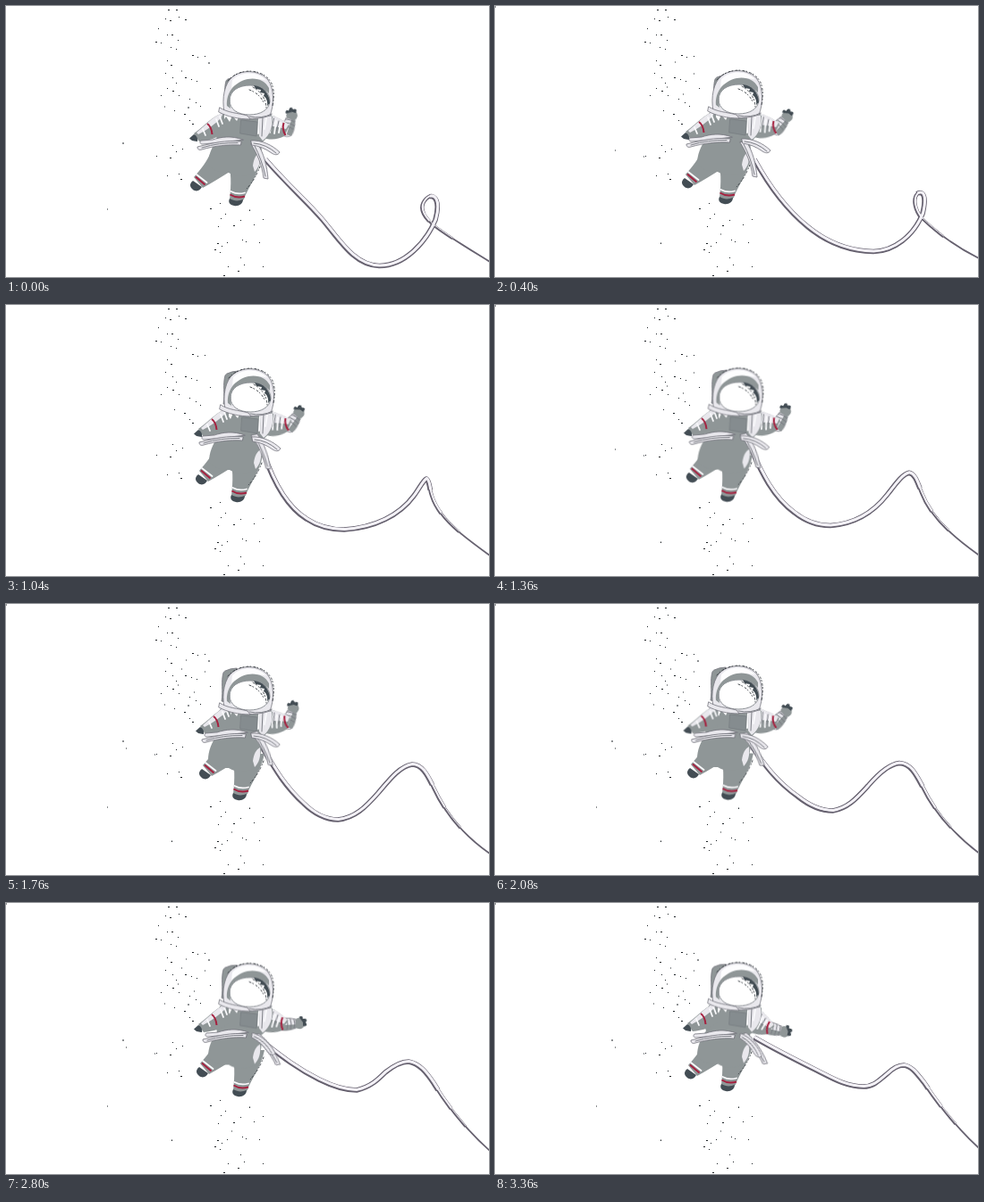
Recreate the animation shown at these times as an HTML page without scripts. Size 540 by 304 pixels, loop 3440 ms.

```html
<!DOCTYPE html>
<html lang="en">
<head>
<meta charset="utf-8">
<title>Astronaut on a tether</title>
<style>
html, body { margin: 0; width: 100%; height: 100%; overflow: hidden; background: #fff; }
svg { display: block; width: 100vw; height: 100vh; }
path { stroke-linecap: round; stroke-linejoin: round; }

.move { animation: 3.44s infinite; }
.suit { fill: #8f9697; }
.pale { fill: #e9e8ed; }
.white { fill: #fdfdfe; }
.dark { fill: #434d54; }
.edge { stroke: #74747d; stroke-width: .8; }
.line { fill: none; stroke: #7c7e85; stroke-width: 1; }
.shine { fill: none; stroke: #fafafc; stroke-width: 1.8; }
.red { fill: none; stroke: #a5213f; stroke-width: 2; stroke-linecap: butt; }
.speck { fill: none; stroke: #30363b; stroke-width: .9; stroke-dasharray: 2 2 1 3; }
.dots { fill: none; stroke: #1c2226; stroke-width: 1; stroke-linecap: butt; shape-rendering: crispEdges; }

.rope { fill: none; animation: rope 3.44s infinite; stroke-linecap: butt; }
.rim { stroke: #66616f; }
.core { stroke: #f3f1f6; transform: translate(.5px, -.6px); }

.body { animation-name: body; }
.pack { animation-name: pack; }
.arm-l { animation-name: arm-l; }
.arm-r { animation-name: arm-r; transform-origin: 292px 130px; }
.hand { animation-name: hand; }
.leg-l { animation-name: leg-l; }
.leg-r { animation-name: leg-r; }
.flap-l { animation-name: flap-l; }
.flap-r { animation-name: flap-r; transform-origin: 278px 152px; }
.strap { animation-name: strap; transform-origin: 280px 154px; }
.blink { animation-name: blink; animation-timing-function: step-end; }
.blink.alt { animation-name: blink-alt; }

@keyframes body {
  0% { transform: translate(0, 0); animation-timing-function: steps(5); }
  11.627% { transform: translate(0, -1px); animation-timing-function: steps(8); }
  30.232% { transform: translate(1px, -2px); animation-timing-function: steps(9); }
  51.162% { transform: translate(0, -3px); animation-timing-function: steps(8); }
  69.767% { transform: translate(0, -5px); animation-timing-function: steps(5); }
  81.395% { transform: translate(0, -5.5px); animation-timing-function: steps(7); }
  97.674%, 100% { transform: translate(0, -6.5px); }
}
@keyframes pack {
  0% { transform: translate(3px, 4px); animation-timing-function: steps(5); }
  11.627% { transform: translate(3px, 3px); animation-timing-function: steps(8); }
  30.232% { transform: translate(1px, 1px); animation-timing-function: steps(9); }
  51.162%, 100% { transform: translate(0, 0); }
}
@keyframes arm-l {
  0% { transform: translate(0, 0); animation-timing-function: steps(5); }
  11.627% { transform: translate(3px, -2px); animation-timing-function: steps(8); }
  30.232% { transform: translate(5px, -4px); animation-timing-function: steps(9); }
  51.162% { transform: translate(7px, -6px); animation-timing-function: steps(8); }
  69.767% { transform: translate(4px, -7px); animation-timing-function: steps(5); }
  81.395% { transform: translate(5px, -7px); animation-timing-function: steps(7); }
  97.674%, 100% { transform: translate(5px, -8px); }
}
@keyframes arm-r {
  0% { transform: translate(0, 0) rotate(0deg); animation-timing-function: steps(5); }
  11.627% { transform: translate(1px, -1px) rotate(-3deg); animation-timing-function: steps(8); }
  30.232% { transform: translate(2px, -2px) rotate(-6deg); animation-timing-function: steps(9); }
  51.162% { transform: translate(1px, -3px) rotate(-8deg); animation-timing-function: steps(8); }
  69.767% { transform: translate(0, -5px) rotate(-3deg); animation-timing-function: steps(5); }
  81.395% { transform: translate(-1px, -5px) rotate(7deg); animation-timing-function: steps(7); }
  97.674%, 100% { transform: translate(-2px, -4px) rotate(19deg); }
}
@keyframes hand {
  0% { transform: translate(314px, 140px) rotate(-72deg); animation-timing-function: steps(5); }
  11.627% { transform: translate(315px, 138px) rotate(-50deg); animation-timing-function: steps(8); }
  30.232% { transform: translate(317px, 136px) rotate(-55deg); animation-timing-function: steps(9); }
  51.162% { transform: translate(315px, 134px) rotate(-70deg); animation-timing-function: steps(8); }
  69.767% { transform: translate(312px, 134px) rotate(-26deg); animation-timing-function: steps(5); }
  81.395% { transform: translate(310px, 136px) rotate(-3deg); animation-timing-function: steps(7); }
  97.674%, 100% { transform: translate(306px, 140px) rotate(14deg); }
}
@keyframes leg-l {
  0% { transform: translate(0, 0); animation-timing-function: steps(5); }
  11.627% { transform: translate(3px, -3px); animation-timing-function: steps(8); }
  30.232% { transform: translate(6px, -6px); animation-timing-function: steps(9); }
  51.162% { transform: translate(10px, -11px); animation-timing-function: steps(8); }
  69.767% { transform: translate(8px, -13px); animation-timing-function: steps(5); }
  81.395% { transform: translate(7px, -12px); animation-timing-function: steps(7); }
  97.674%, 100% { transform: translate(6px, -10px); }
}
@keyframes leg-r {
  0% { transform: translate(0, 0); animation-timing-function: steps(5); }
  11.627% { transform: translate(1px, -2px); animation-timing-function: steps(8); }
  30.232% { transform: translate(2px, -3px); animation-timing-function: steps(9); }
  51.162% { transform: translate(4px, -4px); animation-timing-function: steps(8); }
  69.767% { transform: translate(4px, -5px); animation-timing-function: steps(5); }
  81.395% { transform: translate(4px, -7px); animation-timing-function: steps(7); }
  97.674%, 100% { transform: translate(3px, -13px); }
}
@keyframes flap-l {
  0% { transform: translate(0, 0); animation-timing-function: steps(5); }
  11.627% { transform: translate(0, -3px); animation-timing-function: steps(8); }
  30.232% { transform: translate(2px, -4px); animation-timing-function: steps(9); }
  51.162% { transform: translate(5px, -6px); animation-timing-function: steps(8); }
  69.767% { transform: translate(6px, -6px); animation-timing-function: steps(5); }
  81.395% { transform: translate(6px, -5px); animation-timing-function: steps(7); }
  97.674%, 100% { transform: translate(5px, -4px); }
}
@keyframes flap-r {
  0% { transform: translate(0, 0) rotate(0deg); animation-timing-function: steps(5); }
  11.627% { transform: translate(2px, -2px) rotate(0deg); animation-timing-function: steps(8); }
  30.232% { transform: translate(1px, -3px) rotate(0deg); animation-timing-function: steps(9); }
  51.162% { transform: translate(0, -6px) rotate(-1deg); animation-timing-function: steps(8); }
  69.767% { transform: translate(0, -5px) rotate(8deg); animation-timing-function: steps(5); }
  81.395% { transform: translate(1px, -4px) rotate(20deg); animation-timing-function: steps(7); }
  97.674%, 100% { transform: translate(0, -3px) rotate(25deg); }
}
@keyframes strap {
  0% { transform: translate(0, 0) rotate(0deg); animation-timing-function: steps(5); }
  11.627% { transform: translate(0, -2px) rotate(0deg); animation-timing-function: steps(8); }
  30.232% { transform: translate(0, -9px) rotate(-4deg); animation-timing-function: steps(9); }
  51.162% { transform: translate(0, -11px) rotate(-8deg); animation-timing-function: steps(8); }
  69.767% { transform: translate(1px, -8px) rotate(-15deg); animation-timing-function: steps(5); }
  81.395% { transform: translate(2px, -7px) rotate(-18deg); animation-timing-function: steps(7); }
  97.674%, 100% { transform: translate(0, -8px) rotate(-18deg); }
}
@keyframes rope {
  0% { d: path("M290 172C314 200 336 219 354 240C374 264 390 291 417 291.500C446 292 470 264 480 240C487 214 476 210 470 216C458 228 472 242 482 249C500 262 520 274 541 287"); animation-timing-function: steps(5); }
  11.627% { d: path("M290 172C303 196 324 227 350 248C372 266 398 275 423 275.500C446 275 468 258 478 233C483 212 478 208 473 210C466 216 470 230 477 238C496 256 515 270 541 283"); animation-timing-function: steps(8); }
  30.232% { d: path("M288 166C296 190 310 224 336 240C348 248 362 252 378 252C412 250 440 236 456 214C462 206 466 197 470 195C474 198 473 206 476 214C484 240 512 260 541 281"); animation-timing-function: steps(9); }
  51.162% { d: path("M286 160C300 184 311 204 333 224C343 234 357 242 371 242C390 240 402 228 416 212C428 198 440 182 454 180C466 180 472 194 478 206C492 236 512 260 541 280"); animation-timing-function: steps(8); }
  69.767% { d: path("M286 156C300 174 318 194 344 208C354 214 368 222 384 222C400 218 408 206 418 196C428 184 440 178 450 177C464 178 470 190 478 204C492 232 514 256 541 279"); animation-timing-function: steps(5); }
  81.395% { d: path("M290 158C308 172 326 186 350 198C362 204 376 210 392 210C408 206 416 198 424 190C434 182 442 178 450 178C462 180 470 190 478 202C494 228 514 254 541 278"); animation-timing-function: steps(7); }
  97.674%, 100% { d: path("M290 151C312 164 336 176 360 188C376 196 392 206 412 206C424 206 430 198 438 192C444 186 450 182 457 182C466 183 472 192 480 202C496 226 516 252 541 275"); }
}
@keyframes blink {
  0%, 30.232% { opacity: 0; }
  11.627%, 32.557% { opacity: 1; }
}
@keyframes blink-alt {
  0%, 51.162%, 81.395% { opacity: 1; }
  11.627%, 69.767% { opacity: 0; }
}
</style>
</head>
<body>
<svg viewBox="0 0 540 304" preserveAspectRatio="none">
  <!-- scattered specks -->
  <g transform="translate(0 .5)">
    <path class="dots" d="M181 4h2M190 4h2M178 14h1M183 16h2M193 12h1M200 15h2M170 25h1M180 32h1M185 32h2M192 38h1M167 40h2M173 41h1M184 46h1M190 48h1M208 55h2M214 57h1M222 56h1M180 61h1M184 66h2M178 75h1M186 80h1M190 86h1M200 80h2M207 82h1M213 84h1M228 92h1"/>
    <path class="dots" d="M180 92h1M186 95h2M193 100h1M205 104h1M212 108h1M217 112h1M173 100h1M188 117h1M199 121h2M205 128h1M208 132h2M186 156h1M190 163h1M197 160h1M183 170h2M168 168h1M180 190h1M195 194h2M193 188h1"/>
    <path class="dots" d="M239 221h1M228 227h2M245 233h1M240 238h1M237 247h1M262 240h1M254 246h2M287 239h1M277 245h1M264 262h1M268 264h1M236 266h2M241 269h1M247 265h1M233 273h2M239 276h1M262 282h1M266 290h1M248 292h1M259 297h2M243 302h2M287 292h1M283 265h1"/>
    <path class="dots move blink" d="M0 0h1M166 168h1M134 161h1M192 90h1M210 98h1M222 75h1M185 265h1M252 255h1M201 62h1"/>
    <path class="dots move blink alt" d="M130 153h2M113 227h1M226 63h2M196 72h1M177 112h1M203 113h2M272 228h1"/>
  </g>

  <!-- tether: stacked strokes give the taper -->
  <path class="rope rim" pathLength="100" stroke-width="1.8"/>
  <path class="rope rim" pathLength="100" stroke-width="3" stroke-dasharray="88 100"/>
  <path class="rope rim" pathLength="100" stroke-width="4.200" stroke-dasharray="80 100"/>
  <path class="rope rim" pathLength="100" stroke-width="5.600" stroke-dasharray="72 100"/>
  <path class="rope core" pathLength="100" stroke-width="1" stroke-dasharray="88 100"/>
  <path class="rope core" pathLength="100" stroke-width="2" stroke-dasharray="80 100"/>
  <path class="rope core" pathLength="100" stroke-width="3" stroke-dasharray="72 100"/>

  <!-- legs -->
  <g class="move leg-l">
    <path class="suit" d="M230 162C225 174 218 183 210 192L220 204C229 199 240 192 250 186L256 164Z"/>
    <path class="shine" d="M213 189L224.500 198" stroke-width="1.2"/>
    <path class="red" d="M212 191.500L222.500 200.500"/>
    <path class="dark" d="M209 196L219 203C217 207 213 209 209 206C205 203 205 199 209 196Z"/>
  </g>
  <g class="move leg-r">
    <path class="suit" d="M248 172C252 186 252 200 250 217C256 220 261 220 266 217C269 206 281 192 285 172Z"/>
    <path class="shine" d="M251.500 208C257 211 262 211 267 209.500" stroke-width="1.2"/>
    <path class="red" d="M250.500 211.500C256 215 262 215 267 213.500"/>
    <path class="dark" d="M250 216C255 219 260 219 265 217C265 222 260 225 255 224C250 223 248 220 250 216Z"/>
    <path class="speck" d="M284 180Q278 196 268 206"/>
  </g>

  <!-- right arm -->
  <g class="move hand">
    <path class="pale edge" d="M-4 -6C2 -8 9 -6 14 -5V5C8 7 0 8 -4 6C-7 3 -7 -3 -4 -6Z"/>
    <path class="suit" d="M-4 1L14 1V5C8 7 0 8 -4 6Z"/>
    <path class="line" d="M4 -6Q6 0 4 6M8 -6Q10 0 8 6M12 -5Q14 0 12 5"/>
    <path class="suit" d="M14 -5C20 -8 25 -5 24 1C23 7 17 7 14 5Z"/>
    <path class="dark" d="M18 -7C20 -9 23 -8 22 -5L25 -5C27 -4 27 -2 25 -1L26 1C27 3 24 4 22 3L22 -1Z"/>
  </g>
  <g class="move arm-r">
    <path class="suit" d="M286 121C298 121 308 127 317 134L311 146C304 150 294 151 286 147Z"/>
    <path class="pale" d="M287 121C298 121 308 127 316 133L313 138C305 136 296 134 287 134Z"/>
    <path class="shine" d="M297 127L295 142M302 129L300 143M307 131L305 142"/>
    <path class="line" d="M299.500 126L297 138M305 129L302.500 140"/>
    <path class="red" d="M310.500 131C309 136 310 141 312.500 145"/>
  </g>

  <!-- torso -->
  <g class="move body">
    <path class="suit" d="M241 119C235 126 233 140 236 150C230 158 226 168 226 178C232 185 241 187 249 187C258 193 270 192 279 186C285 176 287 164 285 154C294 148 299 136 298 124C282 116 256 114 241 119Z"/>
    <path class="pale" d="M284 121L297 124C299 134 295 145 287 151L283 146Z"/>
    <path class="white" d="M240 121L262 121L258 129L253 123L250 130L246 124L240 133Z"/>
    <path class="pale" d="M276 179C277 171 280 166 284 164C285 174 283 181 278 186Z"/>
    <path d="M263 128L281 130L280 146L262 143Z" fill="#858c8f" stroke="#747a7e" stroke-width=".7"/>
    <path class="shine" d="M283 126L282 143M291 126L289 138"/>
    <path class="line" d="M243 119Q270 130 297 122M287 125L286 146"/>
  </g>

  <!-- left arm -->
  <g class="move arm-l">
    <path class="suit" d="M244 120C232 122 224 133 210 143L216 152C227 151 236 148 244 142Z"/>
    <path class="pale" d="M243 120C233 122 225 132 213 142L215 144C225 139 234 132 240 126Z"/>
    <path class="shine" d="M235 127L238 135M239 124L242 132M220 138L223 145"/>
    <path class="red" d="M225 132C228 134 230 139 230.500 144"/>
    <path class="dark" d="M210 144C213 145 215 149 214 152C211 152 210 151 208 151L205 148.500Z"/>
  </g>

  <!-- belt flaps -->
  <g class="move strap">
    <path class="pale edge" d="M274 155C281 166 286 178 288 193L293 194C292 180 288 164 281 154Z"/>
    <path class="line" d="M278 157Q286 172 290 191"/>
  </g>
  <g class="move flap-r">
    <path class="pale edge" d="M274 151C285 150 298 156 306 164C304 168 300 167 297 165C290 160 283 157 275 156Z"/>
    <path class="line" d="M277 154Q291 155 302 165"/>
  </g>
  <g class="move flap-l">
    <path class="pale edge" d="M265 150C252 145 240 147 231 150L218 151C216 153 217 155 220 155L240 153Z"/>
    <path class="pale edge" d="M263 152C246 150 230 154 214 158C214 161 216 162 219 161C233 157 248 155 262 156Z"/>
    <path class="line" d="M259 153.500Q238 153 219 159"/>
  </g>

  <!-- helmet -->
  <g class="move body">
    <path class="suit edge move pack" d="M245 78Q251 75 258 75L261 90L250 114L241 112C243 101 240 90 243 80Z"/>
    <path class="pale edge" d="M244 119C241 104 244 86 254 79C266 70 285 73 293 83C300 93 300 111 295 123C279 129 257 127 244 119Z"/>
    <path class="white" d="M253 83C264 72 284 74 291 84C281 80 266 82 252 92Z"/>
    <path class="suit" d="M247 112C246 98 254 86 270 82C281 80 290 84 294 92L294 98C286 88 264 86 255 96C251 102 250 108 251 115Z"/>
    <path d="M250 106C250 95 260 89 273 89C286 89 295 96 295 107C294 117 284 122 272 122C259 122 250 116 250 106Z" fill="#fff" stroke="#8c9095" stroke-width="1"/>
    <path class="dark" d="M277 89C287 90 295 98 295 109L292 112C293 106 290 102 288 101L289 98L284 97L285 94L279 93Z"/>
    <path class="speck" d="M272 94Q283 98 288 108M276 91Q290 99 291 114"/>
    <path class="speck" d="M248 84C260 69 288 69 297 87Q301 97 298 112"/>
    <path class="pale edge" d="M239 114C248 120 259 120 270 123L273 127C260 127 247 124 238 119Z"/>
    <path class="line" d="M272 124Q286 127 297 121"/>
  </g>
</svg>
</body>
</html>
```
